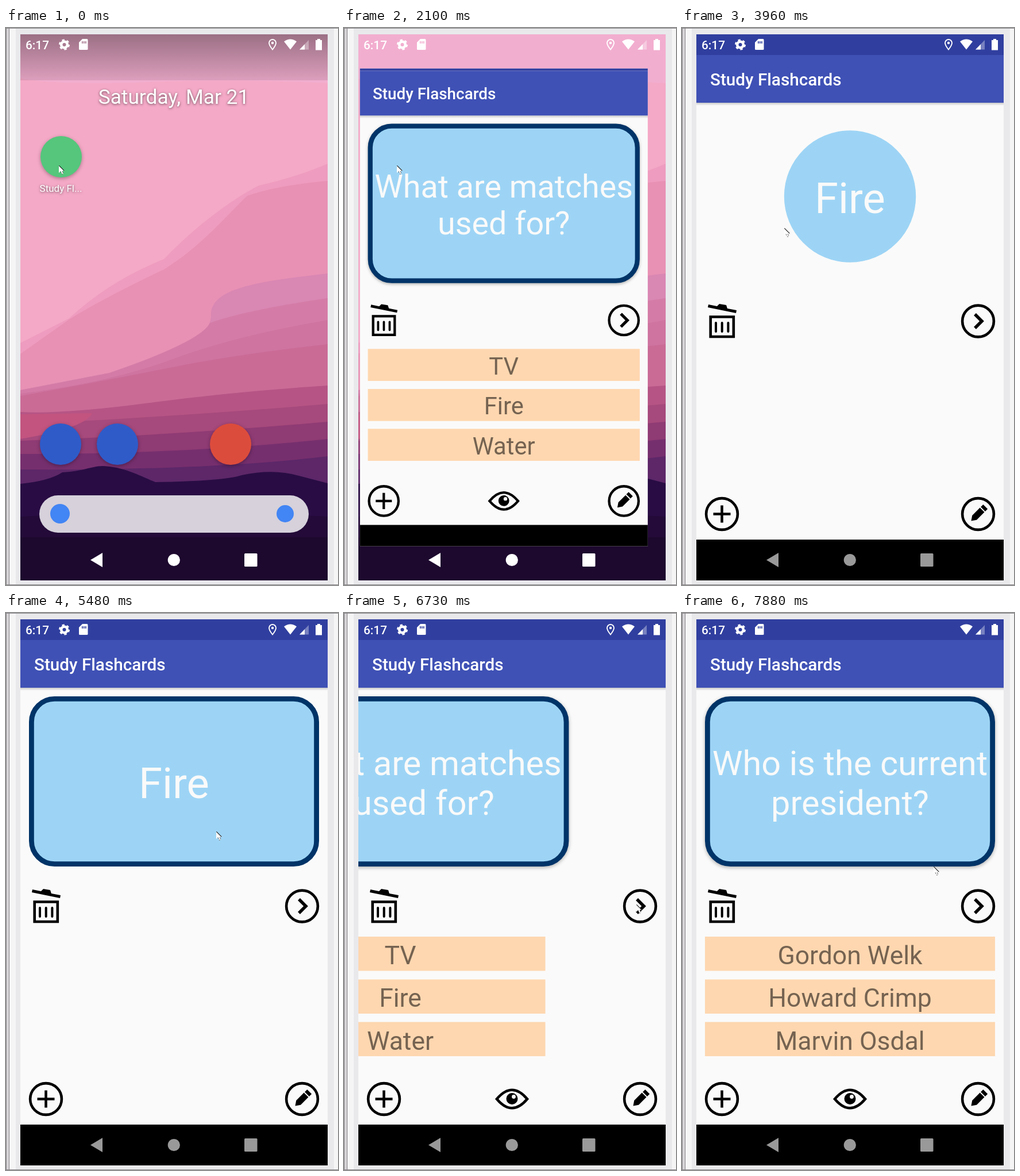
Animation, 578 px wide and 969 px high, one loop 8 s. Source, as an HTML page:

```html
<!DOCTYPE html>
<html lang="en">
<head>
<meta charset="utf-8">
<title>Study Flashcards</title>
<style>
  html, body { margin: 0; width: 100%; height: 100%; overflow: hidden; background: #f5f5f6; }
  svg { display: block; width: 100vw; height: 100vh; font-family: Roboto, sans-serif; }
  .mid { text-anchor: middle; }
  .card { fill: #9dd4f5; stroke: #003468; stroke-width: 8.8; }
  .cardText { fill: #fafafa; font-size: 59.4px; }
  .option { fill: #fed7b0; }
  .optionText { fill: rgba(0, 0, 0, .54); font-size: 44.5px; }
  .line { fill: none; stroke: #000; stroke-width: 4.6; }
  .shadow { filter: drop-shadow(0 2px 3px rgba(0, 0, 0, .3)); }
  .label { fill: #fff; filter: drop-shadow(0 1px 2px rgba(0, 0, 0, .55)); }
</style>
</head>
<body>
<svg viewBox="0 0 578 969">
  <defs>
    <clipPath id="screen"><rect x="25" y="11" width="535" height="950"/></clipPath>
    <clipPath id="crop"><rect id="cropRect" x="25" width="535"/></clipPath>
    <clipPath id="reveal"><circle id="revealCircle" cx="292.5" cy="293"/></clipPath>
    <linearGradient id="scrim" x2="0" y2="1">
      <stop stop-opacity=".36"/><stop offset="1" stop-opacity=".09"/>
    </linearGradient>
    <linearGradient id="barShadow" x2="0" y2="1">
      <stop stop-opacity=".2"/><stop offset="1" stop-opacity="0"/>
    </linearGradient>
    <rect id="card" class="card" x="44.4" y="149.4" width="496.2" height="287.2" rx="40"/>
    <circle id="ring" class="line" r="27.4"/>
  </defs>

  <!-- device frame -->
  <path fill="#d8d6d9" d="M0 0H6V969H0Z"/>
  <path fill="#e9e9ec" d="M17 0H571V969H17Z"/>
  <path fill="none" stroke="#858286" d="M.5 0V969M5.5 0V969M0 .5H578M0 968.5H578"/>

  <g clip-path="url(#screen)">
    <g id="wallpaper">
      <path fill="#f4a9c6" d="M25 11H560V961H25Z"/>
      <path fill="#f2aecf" d="M25 11H560V96Q400 88 250 94T25 88Z"/>
      <path fill="#ee9cbf" d="M560 236Q510 258 440 274C390 300 330 345 275 402Q180 440 110 505L25 548V961H560Z"/>
      <path fill="#e891b4" d="M560 266Q470 274 420 292C385 325 340 380 275 420Q170 470 110 507L25 567V961H560Z"/>
      <path fill="#d987b3" d="M560 427C450 440 355 450 357 500C357 535 310 555 180 600L25 630V961H560Z"/>
      <path fill="#d47ca7" d="M560 470Q420 490 355 513Q340 545 180 600L25 630V961H560Z"/>
      <path fill="#cf74a0" d="M560 508Q400 535 290 576T25 636V961H560Z"/>
      <path fill="#ca6b96" d="M560 550Q400 568 290 590T25 640V961H560Z"/>
      <path fill="#b65585" d="M560 622Q400 632 250 652T25 668V961H560Z"/>
      <path fill="#a6497c" d="M560 654Q350 672 25 690V961H560Z"/>
      <path fill="#c2547f" d="M25 672L150 670Q140 695 25 715Z"/>
      <path fill="#8f3b74" d="M560 685Q300 708 25 718V961H560Z"/>
      <path fill="#762f6e" d="M560 715Q300 742 25 741V961H560Z"/>
      <path fill="#5d2768" d="M560 745Q350 770 25 768V961H560Z"/>
      <path fill="#290c44" d="M25 793Q75 788 98 773C135 771 150 762 168 762C205 763 235 780 260 790Q380 788 410 778Q465 766 510 779L560 792V961H25Z"/>
      <path fill="#230a38" d="M25 850Q290 835 560 850V961H25Z"/>
      <path fill="#1d082e" d="M25 886H560V961H25Z"/>
    </g>

    <g id="launcher">
      <rect x="25" y="11" width="535" height="80" fill="url(#scrim)"/>
      <text class="label mid" x="292" y="132" font-size="35.3">Saturday, Mar 21</text>
      <g class="shadow">
        <circle cx="96" cy="224" r="36" fill="#55c67c"/>
        <circle cx="95" cy="724" r="36" fill="#2f5bc9"/>
        <circle cx="194" cy="724" r="36" fill="#2f5bc9"/>
        <circle cx="391" cy="724" r="36" fill="#dc4c3c"/>
      </g>
      <text class="label mid" x="95.5" y="285" font-size="17">Study Fl...</text>
      <rect x="58" y="813" width="469" height="65" rx="32.5" fill="#d6d1db"/>
      <circle cx="94" cy="845" r="17" fill="#4285f4"/>
      <circle cx="486" cy="845" r="15" fill="#4285f4"/>
    </g>

    <g id="app" clip-path="url(#crop)">
      <path fill="#fafafa" d="M25 11H560V961H25Z"/>
      <rect x="25" y="130" width="535" height="5" fill="url(#barShadow)"/>
      <path fill="#303f9f" d="M25 11H560V47H25Z"/>
      <path fill="#3f51b5" d="M25 47H560V130H25Z"/>
      <path d="M25 890H560V961H25Z"/>
      <text x="49" y="99.5" font-size="29.7" font-weight="500" fill="#fff">Study Flashcards</text>

      <g id="trash">
        <path class="line" d="M49.7 502.5H89.8V537H49.7Z"/>
        <path class="line" stroke-linecap="round" style="stroke-width:4" d="M59 513V528M69.7 513V528M80.4 513V528"/>
        <path d="M46 481L61 484L65 480L77 482L79 488L95 491L94 496L45 486Z"/>
      </g>
      <use href="#ring" x="515.5" y="510"/>
      <path class="line" style="stroke-width:5.5" d="M510 498L522 510L510 522"/>
      <use href="#ring" x="69.5" y="845.5"/>
      <path class="line" d="M54.5 845.5H84.5M69.5 830.5V860.5"/>
      <use href="#ring" x="515.5" y="845.5"/>
      <path transform="translate(515.5 845.5) rotate(45)" d="M-5.5 -18H5.5V-12H-5.5ZM-5.5 -10H5.5V9L0 17L-5.5 9Z"/>

      <g id="eye">
        <path class="line" d="M266 845.5Q292.5 814 319 845.5Q292.5 877 266 845.5Z"/>
        <circle cx="292.5" cy="845" r="10"/>
        <circle cx="295.5" cy="841.5" r="3.4" fill="#fafafa"/>
      </g>

      <g id="question">
        <use href="#card" class="shadow"/>
        <text class="cardText mid" x="292.5" y="282"></text>
        <text class="cardText mid" x="292.5" y="351"></text>
      </g>
      <g id="options">
        <path class="option" d="M40 563H545V622.5H40ZM40 637.5H545V697H40ZM40 711.5H545V771H40Z"/>
        <text class="optionText mid" x="292.5" y="610.5"></text>
        <text class="optionText mid" x="292.5" y="685"></text>
        <text class="optionText mid" x="292.5" y="759.5"></text>
      </g>
      <g id="answer" clip-path="url(#reveal)">
        <use href="#card"/>
        <text class="cardText mid" x="292.5" y="322" style="font-size:74.2px">Fire</text>
      </g>
    </g>

    <g id="statusBar" fill="#fff">
      <text x="34" y="36.5" font-size="20.8" font-weight="500">6:17</text>
      <circle cx="101.5" cy="29" r="5.3" fill="none" stroke="#fff" stroke-width="4.5"/>
      <circle cx="101.5" cy="29" r="8.2" fill="none" stroke="#fff" stroke-width="2.6" stroke-dasharray="4.3 4.287"/>
      <path fill-rule="evenodd" d="M133 19H141Q142.5 19 142.5 21V36.5Q142.5 38 141 38H128.5Q127 38 127 36.5V25ZM132 23V27H133.7V23ZM135 23V27H136.7V23ZM138 23V27H139.7V23Z"/>
      <g id="pin">
        <path fill="none" stroke="#fff" stroke-width="1.9" d="M464 37.5Q458 30 458 26A6 6 0 0 1 470 26Q470 30 464 37.5Z"/>
        <circle cx="464" cy="26" r="2.2"/>
      </g>
      <path d="M484 23.5Q495 15.5 506 23.5L495 37.5Z"/>
      <path opacity=".35" d="M511 37.5L527 21V37.5Z"/>
      <path d="M511 37.5L520 28.2V37.5Z"/>
      <path d="M539 21H542V19H547V21H550V38.5H539Z"/>
    </g>
    <g id="nav">
      <path d="M147 925.5L168 913V938Z"/>
      <circle cx="292.3" cy="925.5" r="10.6"/>
      <rect x="415" y="914" width="22.5" height="23" rx="1.5"/>
    </g>
  </g>

  <g id="cursor">
    <path fill="#fff" d="M0 0V13L3 10L5.5 15.5L8 14.5L6 9.5H10Z"/>
    <path fill="none" stroke="#111" stroke-width="1.1" d="M.3 .3L9.3 9.3"/>
    <path fill="none" stroke="#555" stroke-width=".9" d="M3 10.3L4.3 13M6.2 10L7.6 13.6M4.8 14.8L7 15"/>
  </g>
</svg>

<script>
const LOOP = 8000;
const LAUNCH = 1802, REVEAL = 3620, HIDE = 5760;
const CARD_OUT = 6550, OPTIONS_OUT = 6524, SLIDE = 500;

// The screen is refreshed only at these moments.
const steps = [
  0, 1860, 1980, 2100, 2250, 2400,
  2680, 2810, 2950, 3080, 3210, 3340, 3470, 3620,
  3770, 3960, 4130, 4280, 4410,
  4780, 4920, 5060, 5200, 5340, 5480,
  5760, 5900, 6030, 6160, 6300,
  6580, 6730, 6900, 7040, 7180, 7320, 7460, 7600, 7880
];

// time, x, y
const cursorPath = [
  [0, 92, 239], [2550, 92, 239], [3210, 178, 348], [4640, 178, 348],
  [5060, 511, 493], [5200, 511, 493], [5480, 366, 380], [5760, 366, 380],
  [6200, 509, 507], [7750, 509, 507], [7880, 438, 441], [LOOP, 438, 441]
];

const decks = [
  { question: ['What are matches', 'used for?'], options: ['TV', 'Fire', 'Water'] },
  { question: ['Who is the current', 'president?'], options: ['Gordon Welk', 'Howard Crimp', 'Marvin Osdal'] }
];

const $ = id => document.getElementById(id);
const clamp = v => Math.min(1, Math.max(0, v));
const mix = (a, b, p) => a + (b - a) * p;
const progress = (t, start, duration) => clamp((t - start) / duration);
const ease = p => (1 - Math.cos(Math.PI * p)) / 2;
const show = (id, visible) => { $(id).style.display = visible ? '' : 'none'; };
const move = (id, x, y = 0) => $(id).setAttribute('transform', `translate(${x} ${y})`);

// cubic-bezier(.2, 0, 0, 1), solved by bisection
function launchEase(x) {
  let lo = 0, hi = 1;
  for (let i = 0; i < 20; i++) {
    const m = (lo + hi) / 2;
    if (.6 * m * (1 - m) ** 2 + m ** 3 < x) lo = m; else hi = m;
  }
  return 3 * lo * lo * (1 - lo) + lo ** 3;
}

function slideOffset(t, start) {
  const out = ease(progress(t, start, SLIDE));
  return out < 1 ? -535 * out : 535 * (1 - ease(progress(t, start + SLIDE, SLIDE)));
}

function setTexts(id, lines) {
  $(id).querySelectorAll('text').forEach((node, i) => { node.textContent = lines[i]; });
}

function drawLaunch(t) {
  const p = t >= 2400 ? 1 : launchEase(progress(t, LAUNCH, 500));
  const pY = launchEase(progress(t, LAUNCH, 250));
  const scale = mix(72 / 535, 1, p);
  const height = mix(535, 950, p ** 2.2);
  show('app', t >= 1860);
  $('app').setAttribute('transform',
    `translate(${mix(96, 292.5, p)} ${mix(224, 486, pY)}) scale(${scale}) translate(-292.5 -486)`);
  $('cropRect').setAttribute('y', 486 - height / 2);
  $('cropRect').setAttribute('height', height);
  $('launcher').style.opacity = 1 - ease(progress(t, LAUNCH, 250));
}

function drawCards(t) {
  const answered = t >= REVEAL && t < HIDE;
  for (const id of ['question', 'options', 'eye']) show(id, !answered);
  show('answer', answered);
  $('revealCircle').setAttribute('r', 293 * ease(progress(t, REVEAL, 790)));
  move('question', slideOffset(t, CARD_OUT));
  move('options', slideOffset(t, OPTIONS_OUT));
  setTexts('question', decks[+(t >= CARD_OUT + SLIDE)].question);
  setTexts('options', decks[+(t >= OPTIONS_OUT + SLIDE)].options);
}

function drawCursor(t) {
  const i = cursorPath.findIndex(key => key[0] > t);
  const [t0, x0, y0] = cursorPath[i - 1], [t1, x1, y1] = cursorPath[i];
  const p = (t - t0) / (t1 - t0);
  move('cursor', mix(x0, x1, p), mix(y0, y1, p));
}

function draw(now) {
  const time = now % LOOP;
  const t = steps.findLast(step => step <= time);
  drawLaunch(t);
  drawCards(t);
  drawCursor(t);
  const grey = Math.round(mix(255, 153, progress(t, 2600, 1040)));
  $('nav').setAttribute('fill', `rgb(${grey},${grey},${grey})`);
  show('pin', t < 7180);
}

const began = performance.now();
function tick() {
  draw(performance.now() - began);
  requestAnimationFrame(tick);
}
tick();
</script>
</body>
</html>
```
